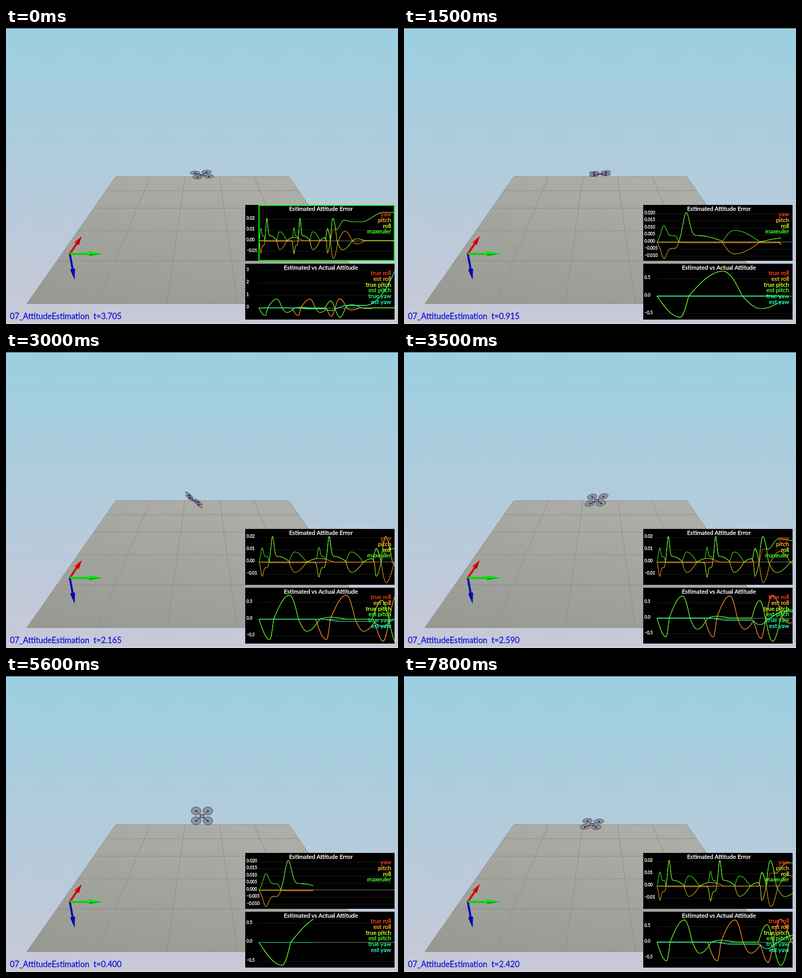
Animation of 798x604 px, one loop 7.9 s. Source, as an HTML page:

```html
<!DOCTYPE html>
<html lang="en">
<head>
<meta charset="utf-8">
<title>Attitude estimation</title>
<style>
html, body { margin: 0; width: 100%; height: 100%; overflow: hidden; }
svg { display: block; width: 798px; height: 604px; font-family: Lato, sans-serif; }
.plot text { font-size: 12.2px; stroke-width: .4; white-space: pre; }
.plot .tick text { font-size: 8.5px; fill: #fff; stroke: #fff; }
.plot path { fill: none; stroke-width: 1.05; stroke-linejoin: round; }
.status { font-size: 16.4px; fill: #1414dc; stroke: #1414dc; stroke-width: .3; }
</style>
</head>
<body>
<svg id="stage" viewBox="0 0 798 604">
  <defs>
    <linearGradient id="sky" x2="0" y2="1">
      <stop stop-color="#9bcfe0"/><stop offset="1" stop-color="#c9c8d7"/>
    </linearGradient>
    <linearGradient id="slab" x1="0" y1="1" x2=".6" y2="0">
      <stop stop-color="#989893"/><stop offset="1" stop-color="#aeaea9"/>
    </linearGradient>
    <clipPath id="clip"><rect x="514" y="361" width="277" height="234"/></clipPath>
  </defs>
  <rect width="798" height="604" fill="url(#sky)"/>
  <rect width="798" height="1" fill="#333a3e"/>
  <rect y="602" width="798" height="2" fill="#d6d6d4"/>
  <path id="floor" transform="translate(.5 .5)" fill="url(#slab)" stroke="#8b8b88"/>
  <g id="drone"></g>
  <g id="axes"></g>
  <g id="plots"></g>
  <rect id="pass" x="515" y="362" width="275.5" height="112.5" fill="none" stroke="#0cff0c" stroke-width="2"/>
  <g class="status"><text x="8" y="594">07_AttitudeEstimation</text><text id="time" x="178" y="594"></text></g>
</svg>
<script>
const { sin, cos, exp, abs, max, min, PI } = Math;
const $ = id => document.getElementById(id);
const NS = 'http://www.w3.org/2000/svg';
function add(parent, tag, attrs, text) {
  const el = document.createElementNS(NS, tag);
  for (const k in attrs) el.setAttribute(k, attrs[k]);
  if (text !== undefined) el.textContent = text;
  return parent.appendChild(el);
}

// Quarter sines from 0 at a up to h at c and back to 0 at b
function arch(t, a, c, b, h) {
  if (t <= a || t >= b) return 0;
  return h * (t < c ? sin(PI / 2 * (t - a) / (c - a)) : cos(PI / 2 * (t - c) / (b - c)));
}
const bump = (t, c, w, h) => h * exp(-(((t - c) / w) ** 2));
function rise(t, a, b) {
  const u = min(1, max(0, (t - a) / (b - a)));
  return u * u * (3 - 2 * u);
}

// Attitude: a kick in pitch, the same later in roll, then a combined one
const LAG = .905;
const kick = t => arch(t, 0, .17, .233, -.6) + arch(t, .233, .487, .63, .71) + arch(t, .63, .765, .97, -.355);
const pitch = t => kick(t) + arch(t, .97, 1.135, 1.4, .06) + arch(t, 1.81, 1.96, 2.07, .56)
  + arch(t, 2.07, 2.21, 2.36, -.74) + arch(t, 2.36, 2.52, 2.8, .27) + arch(t, 2.8, 2.95, 3.15, -.04);
const roll = t => kick(t - LAG) + arch(t, 1.84, 1.98, 2.08, -.64) + arch(t, 2.08, 2.2, 2.4, .73)
  + arch(t, 2.4, 2.52, 2.75, -.16);
const yaw = t => min(3.12, -.06 * rise(t, 1, 1.3) + arch(t, 1.83, 1.96, 2.1, -.15)
  + .28 * rise(t, 2.05, 2.4) + 4.2 * max(0, t - 2.9) ** 2);

// Estimation errors
const kickErr = t => bump(t, .05, .028, -.009) + arch(t, 0, .13, .17, -.0045)
  + bump(t, .215, .034, .0186) + arch(t, .17, .3, .5, .0046) + arch(t, .48, .57, .76, -.0083);
const pitchErr = t => kickErr(t) + arch(t, .76, .95, 1.2, .003) + arch(t, 1.82, 1.87, 1.95, .0105)
  + arch(t, 1.95, 2.03, 2.16, -.0166) + arch(t, 2.17, 2.35, 2.55, .0088) + arch(t, 2.55, 2.66, 2.9, -.003);
const rollErr = t => kickErr(t - LAG) + bump(t, LAG + .05, .03, -.0006) + arch(t, 1.665, 1.8, 1.845, .0028)
  + arch(t, 1.845, 1.87, 1.95, -.0115) + arch(t, 1.95, 2.02, 2.13, .0208)
  + arch(t, 2.13, 2.28, 2.55, -.0085) + arch(t, 2.55, 2.67, 2.9, .0018);
const yawErr = t => -.0006 * (rise(t, .15, .2) - rise(t, .9, 1.1)) + .0106 * rise(t, 1.94, 2.03)
  + .0085 * rise(t, 2.12, 2.32) - .0015 * rise(t, 2.35, 2.55) + .0088 * rise(t, 2.8, 3.4);
const maxErr = t => max(...[yawErr, pitchErr, rollErr].map(f => abs(f(t))));
const estimate = (f, e) => t => f(t) - e(t);

// Drone centre on screen
const posX = t => 399 + arch(t, .98, 1.39, 1.75, -19.5) + arch(t, 1.88, 2.29, 2.68, -19);
const posY = t => 298 + arch(t, .1, .4, .9, -12) + arch(t, 1.4, 2.35, 4.2, 5);

// Simulation clock: [ms, seconds] with a restart at 400 and 5100
const LOOP = 7900, STEP = 100;
const KNOTS = [[0, 3.705], [399, 4.03], [400, .02], [1500, .915], [2400, 1.655], [3500, 2.59],
  [5099, 3.99], [5100, .015], [5600, .4], [6700, 1.465], [LOOP, 2.505]];
function simTime(ms) {
  const at = Math.floor(ms % LOOP / STEP) * STEP;
  const i = KNOTS.findIndex(k => k[0] > at);
  const [a, u] = KNOTS[i - 1], [b, v] = KNOTS[i];
  return Math.round((u + (v - u) * (at - a) / (b - a)) * 200) / 200;
}

// Floor in perspective: inverse width is linear in depth
const CELLS = 5, FAR = 352, NEAR = 714, MID = 399;
let grid = 'M223 303H575L756 562H42Z';
for (let i = 1; i < CELLS; i++) {
  const u = i / CELLS, w = 1 / ((1 - u) / FAR + u / NEAR);
  const y = 303 + (w - FAR) / (NEAR - FAR) * 259;
  grid += `M${MID + FAR * (u - .5)} 303L${MID + NEAR * (u - .5)} 562M${MID - w / 2} ${y}h${w}`;
}
$('floor').setAttribute('d', grid);

// Coordinate arrows
function arrow(dx, dy, neck, color, shade) {
  const len = Math.hypot(dx, dy) + 1;
  const g = add($('axes'), 'g', { transform: `translate(130 460.5) rotate(${Math.atan2(dy, dx) * 180 / PI})` });
  add(g, 'rect', { y: -2, width: neck, height: 4, fill: color });
  add(g, 'rect', { y: .8, width: neck, height: 1.2, fill: shade });
  add(g, 'path', { d: `M${neck} -5L${len} 0L${neck} 5Q${neck - 2} 0 ${neck} -5`, fill: color });
  add(g, 'path', { d: `M${neck} 5L${len} 0L${neck} 1Z`, fill: shade });
}
arrow(23.5, -35, 25, '#e80404', '#a80000');
arrow(9.5, 52, 32, '#0808c8', '#000090');
arrow(66, 0, 39, '#08e808', '#06a806');

// Drone
const ARM = 12, DISC = 9.8, TILT = .38;
const rotors = [[-1, 1], [1, 1], [-1, -1], [1, -1]];
const parts = {
  discs: rotors.map(() => add($('drone'), 'path', { fill: '#828b91', 'fill-opacity': .85, stroke: '#373b3e', 'stroke-width': .9 })),
  arms: rotors.map(([, y]) => add($('drone'), 'path', { stroke: y > 0 ? '#d8482c' : '#3c3c58', 'stroke-width': 1.4 })),
  hubs: rotors.map(() => add($('drone'), 'circle', { r: 1.7, fill: '#1c1c70' })),
  body: add($('drone'), 'path', { fill: '#8c90a4', stroke: '#2626a8', 'stroke-width': 1.2 })
};
function drawDrone(t) {
  const r = roll(t), p = pitch(t), w = yaw(t), cx = posX(t), cy = posY(t);
  const project = (x, y, z = 0) => {
    const x1 = x * cos(r) + z * sin(r), z1 = z * cos(r) - x * sin(r);
    const y1 = y * cos(p) - z1 * sin(p), z2 = y * sin(p) + z1 * cos(p);
    const y2 = y1 * cos(w) - x1 * sin(w);
    return [cx + x1 * cos(w) + y1 * sin(w), cy - z2 * cos(TILT) - y2 * sin(TILT)].map(v => v.toFixed(2));
  };
  const shape = pts => 'M' + pts.map(q => q.join(' ')).join('L') + 'Z';
  rotors.forEach(([sx, sy], i) => {
    const x = sx * ARM, y = sy * ARM, ring = [];
    for (let a = 0; a < 2 * PI; a += PI / 14) ring.push(project(x + DISC * cos(a), y + DISC * sin(a), 1));
    parts.discs[i].setAttribute('d', shape(ring));
    parts.arms[i].setAttribute('d', shape([project(sx * 3, sy * 3), project(x, y)]));
    const [hx, hy] = project(x, y, .5);
    parts.hubs[i].setAttribute('cx', hx);
    parts.hubs[i].setAttribute('cy', hy);
  });
  parts.body.setAttribute('d', shape([[-4, 4], [4, 4], [4, -4], [-4, -4]].map(([x, y]) => project(x, y))));
}

// Plots: both axes scale to the data so far
const DT = .005, LEFT = 515, WIDTH = 276;
function plot(top, title, series) {
  const g = add($('plots'), 'g', { class: 'plot' });
  add(g, 'rect', { x: 487, y: top, width: 304, height: 114 });
  const ticks = add(g, 'g', { class: 'tick' });
  const lines = add(g, 'g', { 'clip-path': 'url(#clip)' });
  add(g, 'text', { x: 641, y: top + 12, 'text-anchor': 'middle', fill: '#fff', stroke: '#fff' }, title);
  const rows = series.map(([name, color, f], i) => {
    add(g, 'text', { x: 784, y: top + 23.2 + 11.75 * i, 'text-anchor': 'end', fill: color, stroke: color }, name);
    const data = Array.from({ length: 820 }, (_, k) => f(k * DT));
    return { data, path: add(lines, 'path', { stroke: color }) };
  });
  return t => {
    const count = Math.round(t / DT) + 1;
    let lo = 0, hi = 0;
    for (const { data } of rows) for (let k = 0; k < count; k++) {
      lo = min(lo, data[k]);
      hi = max(hi, data[k]);
    }
    const range = max(hi - lo, 1e-4);
    const y = v => (top + 15.3 + (hi - v) * 94 / range).toFixed(2);
    const dx = WIDTH * DT / max(1, t);
    for (const { data, path } of rows) {
      let d = '';
      for (let k = 0; k < count; k++) d += (k ? 'L' : 'M') + (LEFT + k * dx).toFixed(2) + ' ' + y(data[k]);
      path.setAttribute('d', d);
    }
    const decade = Math.floor(Math.log10(range)), half = range / 10 ** decade < 3.28;
    const step = 10 ** decade * (half ? .5 : 1), digits = max(0, half ? 1 - decade : -decade);
    ticks.textContent = '';
    for (let n = Math.ceil(lo / step - .05); n <= hi / step + .08; n++) {
      const at = +y(n * step);
      add(ticks, 'rect', { x: 514, y: Math.round(at - .5), width: 277, height: 1, fill: n ? '#1c1c1c' : '#858585' });
      add(ticks, 'text', { x: 489.5, y: at + .7 }, (n * step).toFixed(digits).replace('-', '\u2212'));
    }
  };
}
const RED = '#ff3c14', ORANGE = '#ffae28', LIME = '#c4ff1e', GREEN = '#46ff28';
const plots = [
  plot(361, 'Estimated Attitude Error', [
    ['yaw', RED, yawErr], ['pitch', ORANGE, pitchErr], ['roll', LIME, rollErr], ['maxeuler', GREEN, maxErr]]),
  plot(481, 'Estimated vs Actual Attitude', [
    ['true roll', RED, roll], ['est roll', ORANGE, estimate(roll, rollErr)],
    ['true pitch', LIME, pitch], ['est pitch', GREEN, estimate(pitch, pitchErr)],
    ['true yaw', '#1eff6e', yaw], ['est yaw', '#1effc8', estimate(yaw, yawErr)]])
];

let shown = -1;
function draw(ms) {
  const t = simTime(ms);
  if (t === shown) return;
  shown = t;
  drawDrone(t);
  plots.forEach(update => update(t));
  $('pass').setAttribute('visibility', t >= 3 ? 'visible' : 'hidden');
  $('time').textContent = 't=' + t.toFixed(3);
}

const start = performance.now();
function tick() {
  draw(performance.now() - start);
  requestAnimationFrame(tick);
}
tick();
</script>
</body>
</html>
```
